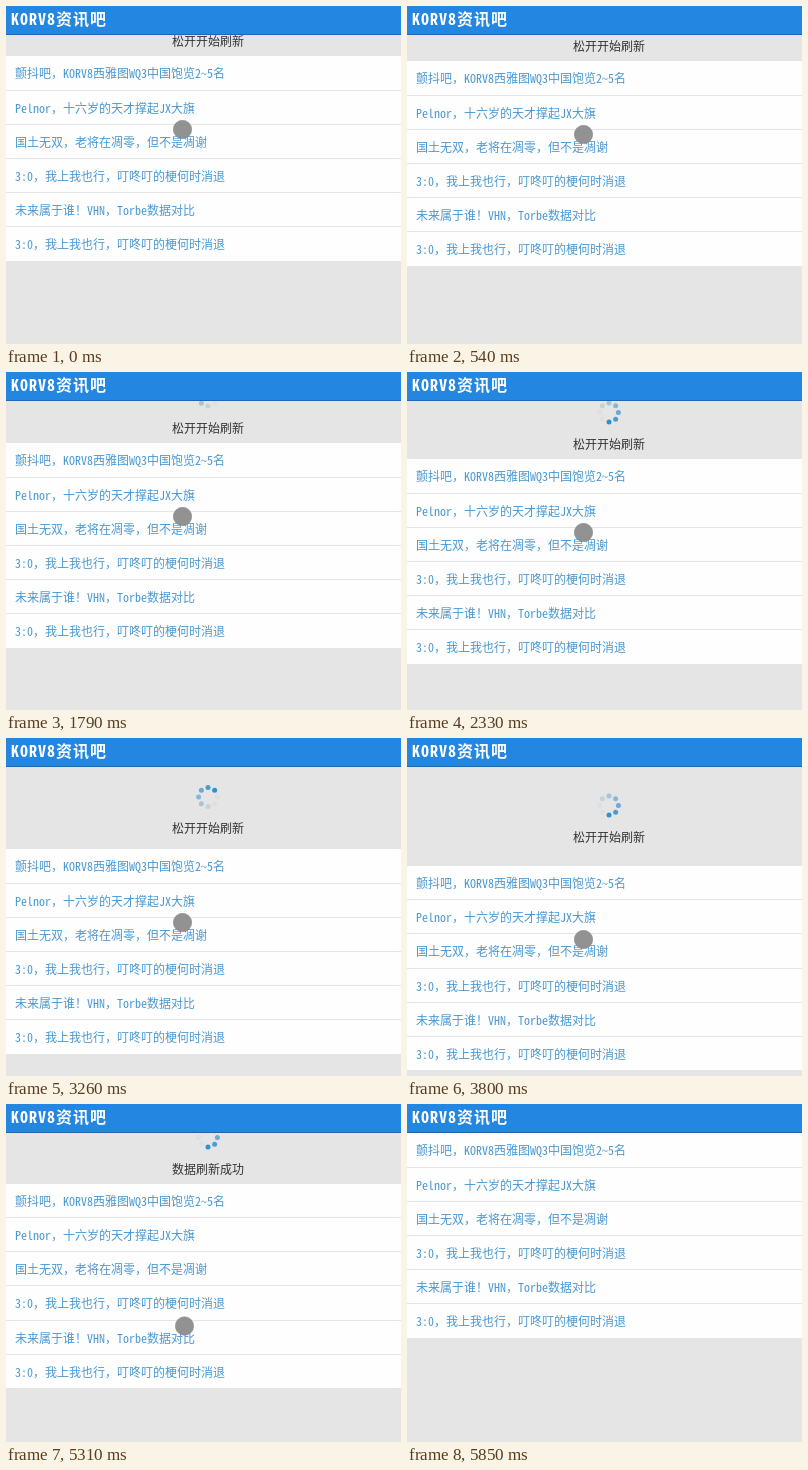
An HTML page for the animation above (6520 ms loop, 395 by 338 pixels).

```html
<!DOCTYPE html>
<html lang="zh-CN">
<head>
<meta charset="utf-8">
<title>下拉刷新</title>
<style>
  html, body { margin: 0; width: 100%; height: 100%; overflow: hidden; background: #e5e5e5; }
  svg { display: block; width: 395px; height: 338px; }
  text { font: 12px "Noto Sans Mono CJK SC", "Noto Sans CJK SC", "Noto Sans CJK", monospace; }
  #list text { fill: #4a98d2; }
  #status { fill: #333; }
  #title { font-size: 16px; font-weight: bold; letter-spacing: 1px; fill: #fff; }
</style>
</head>
<body>
<svg viewBox="0 0 395 338">
  <rect width="395" height="338" fill="#e5e5e5"/>
  <g id="spinner"></g>
  <text id="status" x="166"></text>
  <g id="list"></g>
  <rect width="395" height="28" fill="#2386e0"/>
  <rect y="28" width="395" height="1" fill="#1c69b2"/>
  <text id="title" x="5" y="19">KORV8资讯吧</text>
  <circle id="pointer" r="9.2" fill="#8e8e8e" stroke="#858585" stroke-width=".6" opacity=".96"/>
</svg>
<script>
const LOOP = 6520, STEP = 134.5, SPIN = 186;
const BAR = 29, PITCH = 34.2, DOTS = 8;
const RELEASE = 34, DONE = 38, END = 43;
const lines = [
  '颤抖吧，KORV8西雅图WQ3中国饱览2~5名',
  'Pelnor，十六岁的天才撑起JX大旗',
  '国土无双，老将在凋零，但不是凋谢',
  '3:0，我上我也行，叮咚叮的梗何时消退',
  '未来属于谁！VHN，Torbe数据对比',
  '3:0，我上我也行，叮咚叮的梗何时消退'
];

// Key points as [step, y]
const pull = [[0, 50], [8, 60], [13, 71], [17, 87], [21, 106], [24, 111], [31, 140],
  [RELEASE, 140], [37, 100], [DONE, 94], [39, 79.4], [END, 29]];
const leave = [[RELEASE, 213.5], [DONE, 215], [39, 222], [41, 280], [END, 290]];

function along(points, n) {
  const i = points.findIndex(p => p[0] > n);
  if (i < 0) return points.at(-1)[1];
  const [a, ya] = points[i - 1], [b, yb] = points[i];
  return ya + (yb - ya) * (n - a) / (b - a);
}

const $ = id => document.getElementById(id);
function set(el, attrs) {
  for (const key in attrs) el.setAttribute(key, attrs[key]);
}
function add(parent, name, attrs, text = '') {
  const el = document.createElementNS('http://www.w3.org/2000/svg', name);
  set(el, attrs);
  el.textContent = text;
  return parent.appendChild(el);
}

const rows = lines.map(line => ({
  box: add($('list'), 'rect', { width: 395, fill: '#fefefe' }),
  label: add($('list'), 'text', { x: 9 }, line)
}));
const dots = Array.from({ length: DOTS }, (_, i) => {
  const a = i * 2 * Math.PI / DOTS;
  return add($('spinner'), 'circle', { cx: 9.4 * Math.sin(a), cy: -9.4 * Math.cos(a), r: 2.5 });
});

function draw(clock) {
  const n = Math.floor(clock / STEP);
  const y = along(pull, n) + 0.4;
  // Separator above row i, snapped to whole pixels
  const edge = i => Math.round(y + PITCH * i - 1);
  rows.forEach(({ box, label }, i) => {
    set(box, { y: edge(i) + 1, height: edge(i + 1) - edge(i) - 1 });
    set(label, { y: edge(i) + 23 });
  });

  // Bottom-aligned while the gap is short, centred once it is tall enough
  const top = edge(0) + 1, gap = top - BAR;
  const mid = BAR + Math.min(gap - 15, gap / 2 + 20.5);
  $('status').textContent = n < DONE ? '松开开始刷新' : '数据刷新成功';
  set($('status'), { y: Math.round(mid + 4.5) });
  set($('spinner'), { transform: `translate(202 ${mid - 31.5})` });

  const lead = Math.floor(n * STEP / SPIN) % DOTS;
  dots.forEach((dot, i) => {
    const age = (lead - i + DOTS) % DOTS;
    set(dot, { fill: `rgba(38,138,208,${Math.max(0.04, 0.95 - age * 0.15)})` });
  });

  const held = n <= RELEASE;
  set($('pointer'), {
    cx: held ? 176.5 : 178.5,
    cy: held ? top + 73.5 : along(leave, n),
    visibility: n < END ? 'visible' : 'hidden'
  });
}

const start = performance.now();
function tick() {
  draw((performance.now() - start) % LOOP);
  requestAnimationFrame(tick);
}
tick();
</script>
</body>
</html>
```
